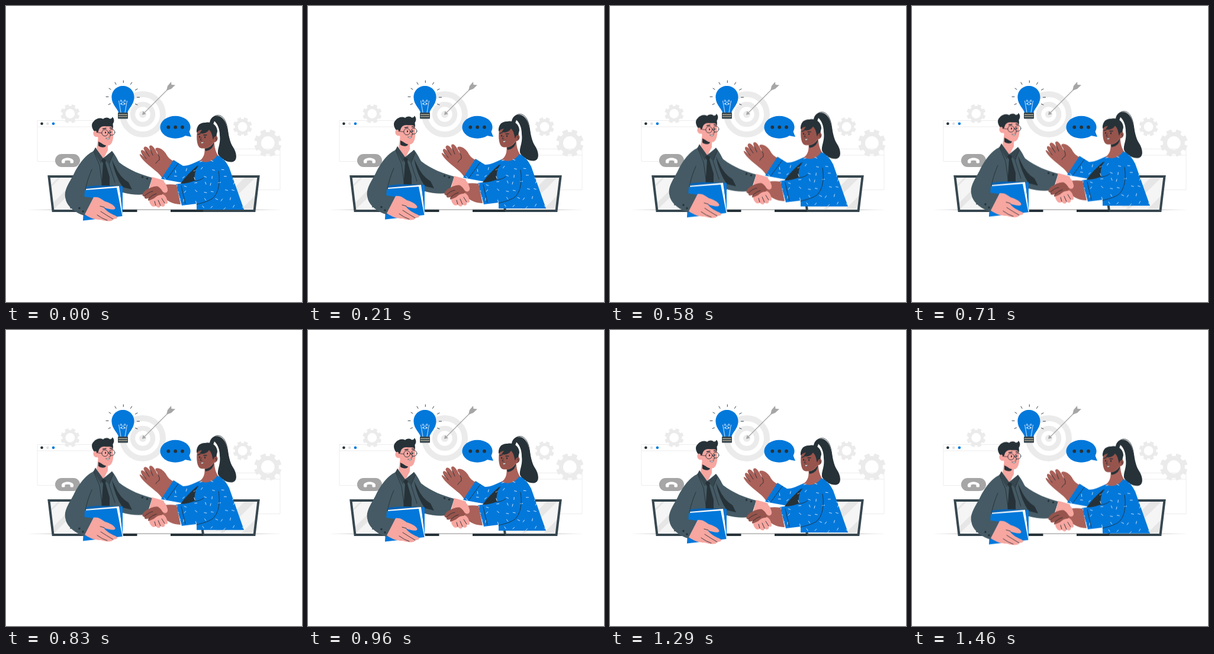
An HTML page for the animation above (1500 ms loop, 500 by 500 pixels).

```html
<!DOCTYPE html>
<html lang="en">
<head>
<meta charset="utf-8">
<title>Handshake</title>
<style>
html, body { margin: 0; width: 100%; height: 100%; overflow: hidden; background: #fff; }
svg { display: block; width: 100vw; height: 100vh; }
.line { fill: none; stroke: #263238; stroke-width: .9; stroke-linecap: round; stroke-linejoin: round; }
.pale { fill: none; stroke: #ebebeb; stroke-width: .9; }
.ink { fill: #263238; }
.suit { fill: #455a64; }
.blue { fill: #0278db; }
.skin { fill: #f7a6a0; }
.brown { fill: #97544c; }
.tan { fill: #aa6159; }
</style>
</head>
<body>
<svg viewBox="0 0 500 500">
  <defs>
    <clipPath id="shirtClip">
      <path d="M283 260L299 270C309 270 318 265 327 261L357 252C366 256 372 263 377 273L402 344H322V334L297 337L287 301L300 299L262 292Z"/>
    </clipPath>
    <linearGradient id="floor">
      <stop offset="0" stop-color="#bbb" stop-opacity=".2"/>
      <stop offset=".12" stop-color="#bbb"/>
      <stop offset=".88" stop-color="#bbb"/>
      <stop offset="1" stop-color="#bbb" stop-opacity=".2"/>
    </linearGradient>
  </defs>

  <!-- Backdrop -->
  <g class="pale">
    <path d="M53 193.5H165V262.500H53ZM53 204H165"/>
    <path d="M350 241.500H463V310.500H350ZM350 252H463"/>
  </g>
  <circle class="ink" cx="60.500" cy="198.700" r="2.300"/>
  <circle cx="70.300" cy="198.700" r="2.200" fill="#e0e0e0"/>
  <circle class="blue" cx="80" cy="198.700" r="2.300"/>
  <g id="gears" fill="none" stroke="#ebebeb"></g>

  <!-- Target and arrow -->
  <g fill="none" stroke="#ebebeb">
    <circle cx="231" cy="183" r="34" stroke-width="10"/>
    <circle cx="231" cy="183" r="17" stroke-width="8.500"/>
  </g>
  <circle cx="231" cy="183" r="6" fill="#ebebeb"/>
  <path d="M233 181L275 139" stroke="#a6a6a6" stroke-width="1.300"/>
  <path d="M230 184L231.500 177.500L236.500 182.500ZM271 143L273 135L279 128L279.500 133L286 133.500L279 140Z" fill="#a6a6a6"/>

  <!-- Bulb -->
  <path class="blue" d="M190 180C189 174 179 167 178.500 155C178 143 187 135 197.500 135C208 135 217 143 216.500 155C216 167 206 174 205.500 180Z"/>
  <path d="M194 180L190.500 160M201 180L204.500 160M194 162Q192 158 195 159Q198 163 195 166Q193 167 194 164Q197.500 170 201 164Q202 167 200 166Q197 163 200 159Q203 158 201 162" fill="none" stroke="#fff" stroke-width=".8"/>
  <rect x="189" y="180" width="17" height="10.500" rx="1" fill="#37474f"/>
  <path d="M190 183.400H205M190 186.800H205" stroke="#d5c7a5" stroke-width="1"/>
  <path class="line" d="M198.300 126V129.500M212.500 129L210.500 132.500M222 140L218.500 142M225.500 154.200H221.500M169 153.300H173M174 139L177 141M184 129L186 132.500M173 166.500L176.500 165M218.500 165.500L222 167"/>

  <!-- Bubble and call button -->
  <ellipse class="blue" cx="286" cy="204.700" rx="25.600" ry="19"/>
  <path class="blue" d="M309 211L313 221L297 218Z"/>
  <g class="ink"><circle cx="274.300" cy="204.700" r="2.900"/><circle cx="286.200" cy="204.700" r="2.900"/><circle cx="298" cy="204.700" r="2.900"/></g>
  <rect x="83" y="250" width="42" height="22" rx="11" fill="#a6a6a6"/>
  <path d="M94 264V261C97 255 111 255 114 261V264Q114 265.500 112 265.500H110Q108.500 265.500 108.500 264V261.500Q104 260 99.500 261.500V264Q99.500 265.500 98 265.500H96Q94 265.500 94 264Z" fill="#fff"/>

  <!-- Laptops -->
  <ellipse cx="250.500" cy="344.200" rx="214" ry=".9" fill="url(#floor)"/>
  <path d="M72.500 288H158L166 346H79.500ZM426.500 288H325L333 346H419.500Z" fill="#f5f5f5"/>
  <path d="M76 302L88 290H92L77 305ZM79 333L122 290H136L81 343V340ZM376 317L403 290H417L368 339H354ZM361 343L414 290H421L367 343ZM398 343L421 320L419 338L414 343Z" fill="#e6e6e6"/>
  <path d="M158 288H72.500L79.500 346H166Z" fill="none" stroke="#37474f" stroke-width="4"/>
  <path d="M325 288H426.500L419.500 346H333Z" fill="none" stroke="#37474f" stroke-width="4"/>
  <path d="M166 346H221.500M278 346H333" stroke="#263238" stroke-width="4.200"/>

  <g class="bob">
    <!-- Man -->
    <path class="skin" d="M156 221L172 226V244L164 259L153 241Z"/>
    <path class="ink" d="M156 229L169 235.500C168 240 160 239.500 156 236Z"/>
    <path class="skin" d="M155 204C160 198 176 198 180.500 205C181.500 215 183 230 175 235C166 238 157 230 155 221C149 223 145 215 149 211Q152 209 155 213Z"/>
    <path class="ink" d="M149 211.500C145 207 143 199 148 195C152 189.500 160 188 164 191C168 187.500 173 188 175 190.500Q179 191 179.500 187.500C183.500 190 183 196 180.500 199Q181 203 181 206C177 202 171 204 166 203C161 203 157 206 156 212L154 214Q152 209 149 211.500Z"/>
    <g class="line">
      <circle cx="167.200" cy="214.300" r="5.400"/><circle cx="179" cy="213.300" r="4.900"/>
      <path d="M162 214.500L153 213.500M172.600 213.800H174M175 214.500L177 219.500L174 220" stroke-width=".8"/>
      <path d="M163.500 207.500L169 206.500M175.500 206L180 206.500" stroke-width="1.300"/>
    </g>
    <path d="M168.500 223Q172 224.500 175.500 222Q174 226.500 171 225.500Z" fill="#fff" stroke="#263238" stroke-width=".6"/>
    <path class="ink" d="M168 212a1.100 1.700 0 1 0 .1 0M176.700 211.500a1.100 1.700 0 1 0 .1 0"/>

    <path d="M108 342L114 325L135 315L150 342Z" fill="#37474f"/>
    <path class="suit" d="M151 239L164 257L179 245C184 250 188 259 191 264C209 278 229 285 247 290L241 309L235 318C222 320 209 318 197 315V345H141L132 354C119 350 105 340 101 327C96 313 106 300 114 285C121 270 133 252 148 245Z"/>
    <path class="ink" d="M179 260L184 270Q192 289 207 298L213 310L197 306Q184 286 179 260Z"/>
    <path d="M151 239L164 258L160 266L148 245ZM179 245L165 258L174 267L181 250Z" fill="#37474f"/>
    <path class="ink" d="M164 257L169 260L168 265L175 289V309H161L164 266L161 261Z"/>
    <path class="line" d="M145 276Q138 291 134 311M148 245L158 269L163 305M181 250L174 267L184 298" stroke-width=".8"/>
    <g class="ink"><circle cx="230.500" cy="289" r="1.700"/><circle cx="238.500" cy="291.500" r="1.700"/></g>

    <!-- Folder -->
    <path d="M135 305L155 303L197 304V351L150 355Z" fill="#0562b3"/>
    <path d="M135 309L191 304L198 354L140 357Z" fill="#fff"/>
    <path class="blue" d="M133 311L187 307L196.500 355L130 362.500Z"/>
    <path class="blue" d="M192 305L197 304V354Z"/>
    <path class="suit" d="M101 318L147 324L133 354C119 350 104 340 101 327Z"/>
    <g class="ink"><circle cx="124" cy="341.500" r="1.700"/><circle cx="130" cy="347" r="1.700"/></g>
    <path class="skin" d="M148 323C157 322 160 326 167 330C174 332 182 336 184 340C187 345 177 345 165 340C169 346 176 350 182 353C191 356 189 360 181 360C180 365 168 364 160 361C151 361 143 359 133 352Z"/>
    <path class="line" d="M166 340L159 338M160 347Q169 353 181 360M154 353Q162 359 171 362" stroke-width=".8"/>

    <!-- Woman, far arm -->
    <path class="tan" d="M286 263C277 260 273 255 270 249C265 242 258 238 253 240Q251 242 255 246L257 252C254 246 249 236 245 235.500C240 235 242 241 246 248C241 240 236 235 233 239C231 241 235 246 239 251C234 244 229 241 228 245C227 248 232 253 235 256C229 251 225 248 226 252C231 262 243 270 252 278Q259 283 264 291Z"/>
    <path class="line" d="M257 251Q260 255 259 260Q255 262 253 266M244 243L248 252M236 245L242 254M230 250L237 258" stroke-width=".8"/>

    <!-- Woman, hair and head -->
    <g transform="translate(0 2.500)">
      <path class="ink" d="M344 195C345 185 354 180 363 185C377 194 373 219 383 235C390 245 392 259 382 261C373 262 361 255 358 247C357 238 363 230 361 216C361 206 358 197 352 192L349 200Z"/>
      <path class="line" d="M346 191C352 178 365 180 370 191C376 203 374 215 377 223" stroke-width="1"/>
    </g>
    <path class="tan" d="M335 235L352 219C351 235 353 245 359 254C351 265 336 268 326 262C334 257 337 249 335 235Z"/>
    <path class="ink" d="M336 241Q345 240 351 231Q350 243 337 245Z"/>
    <path class="brown" d="M324 207C321 219 322 233 326 238C331 244 345 239 350 230C356 232 360 223 356 220L351 200H326Z"/>
    <path class="ink" d="M322 214C321 203 327 196.500 337 197C349 194.500 357 203 357 212L355 220Q351 220 350 226C348 221 349 215 343 209Q338 217 327 215L331 209Q325 210 322 214Z"/>
    <g class="line">
      <path d="M324 217L328 216M334 218L339 218" stroke-width="1.300"/>
      <path d="M330 222L328 226.500H331M353 223Q356 221 355 227" stroke-width=".8"/>
    </g>
    <path class="ink" d="M327 219.500a1.100 1.600 0 1 0 .1 0M336 220a1.100 1.600 0 1 0 .1 0"/>
    <path d="M329 229.500Q332 231 335 228.500Q333 233 330 232Z" fill="#fff" stroke="#263238" stroke-width=".5"/>

    <!-- Woman, shirt -->
    <path class="blue" d="M283 260L299 270C309 270 318 265 327 261C337 267 350 263 357 252C366 256 372 263 377 273L402 344H322V334L297 337L287 301L300 299L262 292Z"/>
    <path class="ink" d="M324 269Q304 286 295 300Q307 300 319 295Q317 283 324 269Z"/>
    <g id="flecks" clip-path="url(#shirtClip)" stroke="#fff" stroke-width=".8" stroke-linecap="round"></g>
    <path class="line" d="M291 266L272 292M296 304L303 334M359 279C362 295 360 316 349 325C340 331 329 333 322 335M325 270Q315 280 316 295Q327 296 334 290" stroke-width=".8"/>

    <!-- Clasped hands -->
    <path class="skin" d="M247 289C255 291 262 293 267 295L263 319L242 309Z"/>
    <path class="tan" d="M288 302L295 335C284 335 275 331 268 325L250 325L256 304C264 302 276 300 288 302Z"/>
    <path class="skin" d="M263 318C268 317 272 324 273 331C273 335 270 335 268 333C270 338 265 341 261 337C261 342 255 341 253 337C250 341 245 338 243 333C240 329 246 322 250 319Z"/>
    <path class="brown" d="M258 304L268 313L263 319Q257 318 250 325L241 329Q238 327 242 324Q233 328 234 322Q228 321 232 315Q241 305 258 304Z"/>
    <path class="skin" d="M257 293C266 293 271 300 273 309C274 315 269 317 265 314C262 309 258 304 251 303C245 303 241 306 241 306Z"/>
    <path class="line" d="M234 321Q241 314 248 313M241 325Q247 319 254 317M268 333L263 325M261 337L257 328M253 337L251 330" stroke-width=".8"/>
  </g>
</svg>
<script>
const NS = 'http://www.w3.org/2000/svg';
const $ = s => document.querySelector(s);

function add(parent, tag, attrs) {
  const el = document.createElementNS(NS, tag);
  for (const k in attrs) el.setAttribute(k, attrs[k]);
  return parent.appendChild(el);
}

function gear(cx, cy, r) {
  add($('#gears'), 'circle', { cx, cy, r: r * .65, 'stroke-width': r * .31 });
  let d = '';
  for (let i = 0; i < 8; i++) {
    const a = (i + .5) * Math.PI / 4, c = Math.cos(a), s = Math.sin(a);
    d += `M${cx + c * r * .7} ${cy + s * r * .7}L${cx + c * r} ${cy + s * r}`;
  }
  add($('#gears'), 'path', { d, 'stroke-width': r * .4 });
}
gear(108.3, 182, 16);
gear(399.6, 204, 16);
gear(442.3, 231.5, 23);

// Short strokes scattered on a jittered grid
let seed = 17;
const rnd = () => (seed = seed * 16807 % 2147483647) / 2147483647;
let marks = '';
for (let y = 258; y < 344; y += 13) {
  for (let x = 266; x < 402; x += 16) {
    const px = x + rnd() * 9, py = y + rnd() * 7, a = rnd() * Math.PI;
    marks += `M${px} ${py}l${4 * Math.cos(a)} ${4 * Math.sin(a)}`;
  }
}
add($('#flecks'), 'path', { d: marks });

// The pair floats up and back at an even pace
$('.bob').animate(
  [{ transform: 'translateY(0)' }, { transform: 'translateY(-7px)' }, { transform: 'translateY(0)' }],
  { duration: 1500, iterations: Infinity, easing: 'linear' }
);
</script>
</body>
</html>
```
